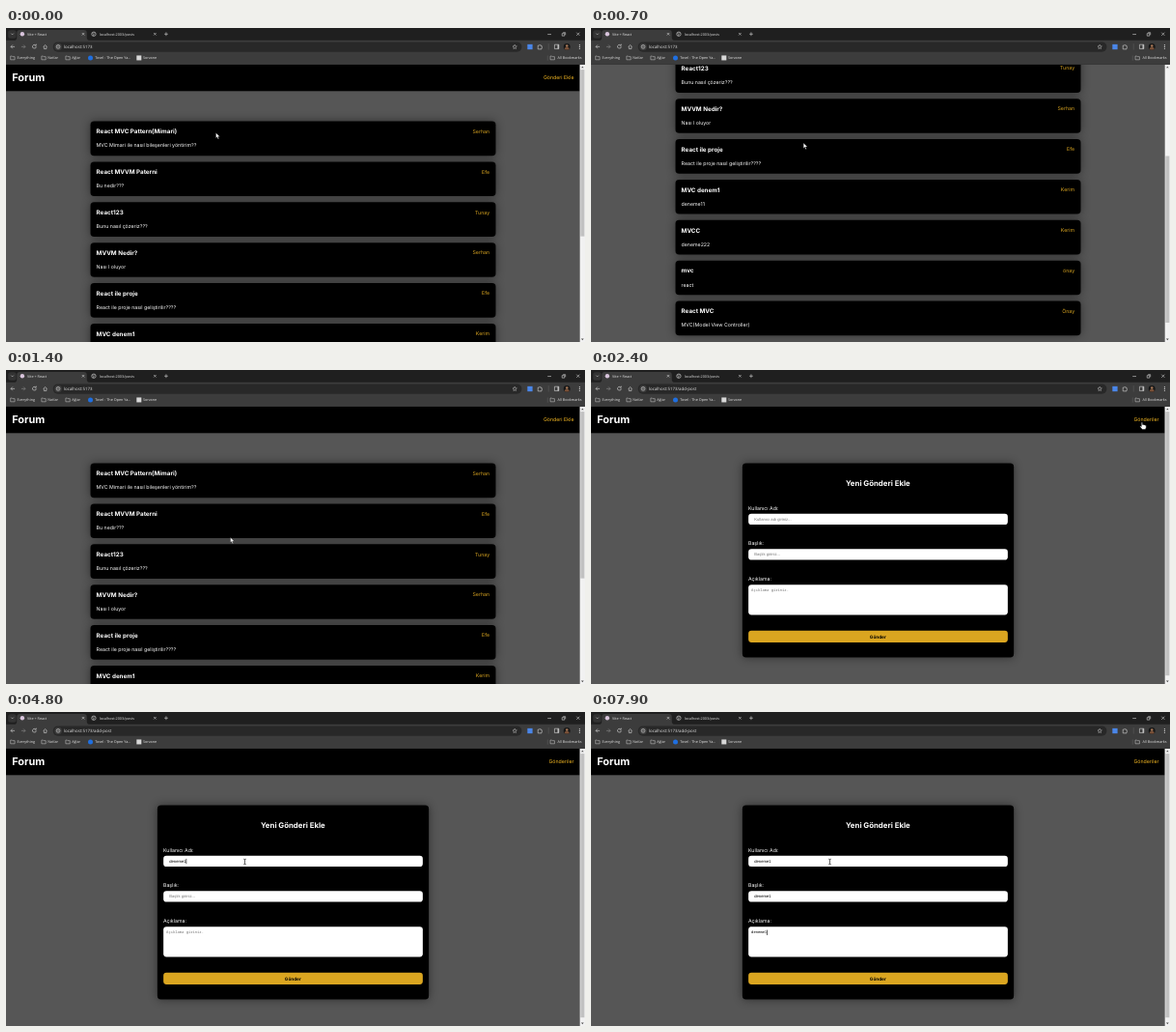
These frames come from a looping animation (600x325 px, 8000 ms). An HTML page:

```html
<!DOCTYPE html>
<html lang="tr">
<head>
<meta charset="utf-8">
<title>Forum</title>
<style>
  html, body { margin: 0; width: 600px; height: 325px; overflow: hidden; background: #565656; }
  :where(#screen, #screen div, #screen svg) { position: absolute; left: 0; top: 0; }
  /* Laid out as a 1920 x 1040 desktop, shown at 600 x 325 */
  #screen { width: 1920px; height: 1040px; overflow: hidden; transform: scale(.3125); transform-origin: 0 0;
    font: 16.8px/24px Inter, sans-serif; color: #fff; text-rendering: geometricPrecision; white-space: nowrap; }
  #view { top: 121px; width: 1903px; height: 919px; overflow: hidden; background: #565656; }
  #page { width: 100%; }
  .header { width: 100%; height: 88px; background: #000; }
  .header b { position: absolute; left: 20px; top: 20px; font-size: 35px; line-height: 48px; }
  #link { left: auto; right: 20px; top: 32px; color: #fbbd23; }
  .card, #form { background: #000; border-radius: 12px; box-shadow: 0 0 30px rgba(0, 0, 0, .45); }
  .card { left: 279.5px; width: 1344px; height: 114px; }
  .card b { position: absolute; left: 20px; top: 20px; font-size: 20px; line-height: 29px; }
  .card span { position: absolute; left: 20px; top: 69px; }
  .card em { position: absolute; right: 20px; top: 22px; font-style: normal; color: goldenrod; }
  #form { left: 501.5px; top: 188px; width: 900px; height: 643px; }
  #form h1 { margin: 0; position: absolute; top: 50px; width: 100%; text-align: center; font: 700 25px/36px Inter, sans-serif; }
  #form label { position: absolute; left: 20px; }
  .field, .send { left: 20px; width: 860px; border-radius: 10px; box-sizing: border-box; }
  .field { height: 36px; padding-left: 20px; background: #fff; color: #000; font: 13.33px/36px "Liberation Sans", Arial, sans-serif; }
  .field.area { height: 100px; padding: 9px 10px; font: 12.2px/20px "Noto Sans Mono", monospace; }
  .field em { font-style: normal; color: #757575; }
  .field i { display: inline-block; width: 2px; height: 17px; margin-right: -2px; background: #000; vertical-align: middle; }
  .send { top: 554px; height: 39px; background: goldenrod; color: #000; text-align: center; font: 700 15px/39px Inter, sans-serif; }
  #bar { left: 1903px; top: 121px; width: 17px; height: 919px; background: #f1f1f1; }
  #thumb { left: 2px; width: 13px; background: #c1c1c1; }
  #chrome text { font: 12px "Open Sans", "Noto Sans", sans-serif; fill: #e3e3e3; }
  #chrome #url { font-size: 14px; }
  #pointer { overflow: visible; }
</style>
</head>
<body>
<div id="screen">
  <div id="view">
    <div id="page">
      <div class="header"><b>Forum</b><div id="link"></div></div>
      <div id="posts"></div>
      <div id="form">
        <h1>Yeni Gönderi Ekle</h1>
        <div class="send">Gönder</div>
      </div>
    </div>
  </div>
  <div id="bar">
    <div id="thumb"></div>
    <svg width="17" height="919" fill="#505050"><path d="M4 11l4.500-5 4.500 5zM4 908l4.500 5 4.500-5z"/></svg>
  </div>

  <svg id="chrome" width="1920" height="121" fill="none" stroke="#d0d0d0" stroke-width="2">
    <g stroke="none">
      <rect width="1920" height="121" fill="#1f1f1f"/>
      <path d="M0 41H26Q36 41 36 31V16Q36 6 46 6H258Q268 6 268 16V31Q268 41 278 41H1920V121H0z" fill="#3c3c3c"/>
      <rect x="7" y="7" width="27" height="27" rx="8" fill="#333"/>
      <rect x="156" y="46" width="1554" height="33" rx="16" fill="#282828"/>
      <circle cx="173" cy="62" r="12" fill="#3c3c3c"/>
      <circle cx="54" cy="20" r="7" fill="#d8c4dc"/>
      <circle cx="280" cy="99" r="8" fill="#1f6fe0"/>
      <rect x="433" y="91" width="16" height="16" fill="#d8d8d8"/>
      <rect x="1729" y="54" width="17" height="17" fill="#4a86e8"/>
      <circle cx="1860" cy="62" r="11" fill="#171717"/>
      <path d="M1852 70q0-7 8-7t8 7l-4 2h-8z" fill="#7b5138"/>
      <circle cx="1860" cy="59" r="4" fill="#a87958"/>
      <g fill="#d0d0d0">
        <circle cx="1902" cy="56" r="2"/><circle cx="1902" cy="62" r="2"/><circle cx="1902" cy="68" r="2"/>
        <path d="M1829 55h4v14h-4z"/>
      </g>
    </g>
    <path d="M17 18l4 4 4-4M252 16l8 8m0-8l-8 8M490 16l8 8m0-8l-8 8M525 20h12m-6-6v12
      M1796 21h12M1844 18h8v8h-8zM1847 15h8v8M1892 15l10 10m0-10l-10 10"/>
    <path d="M29 62H16m6-6l-6 6 6 6M100 61a6 6 0 1 1-2-4m2-4v5h-5M124 62l6-6 6 6M126 61v8h8v-8"/>
    <path d="M51 62h13m-6-6l6 6-6 6" stroke="#888"/>
    <circle cx="291" cy="20" r="7"/>
    <path d="M286 17l6 4-3 5M291 14l4 4"/>
    <circle cx="173" cy="62" r="6"/>
    <path d="M173 61v4m0-7v2"/>
    <path d="M1687 55l2 5 5 .500-4 3.500 1 5-4-3-4 3 1-5-4-3.500 5-.500z" stroke-width="1.500"/>
    <path d="M1764 58h4q2-5 4 0h4v4q5 2 0 4v4h-12zM1819 55h14v14h-14z"/>
    <path d="M1799 52v20M1796 91v17" stroke="#5a5a5a"/>
    <g id="folders"></g>
    <g id="captions" stroke="none"><text id="url" x="192" y="67"></text></g>
  </svg>

  <svg id="pointer" width="1" height="1">
    <path id="arrow" d="M0 0V18L4 14 7 21 10 20 7 13H13z" fill="#fff" stroke="#000"/>
    <path id="hand" d="M0 2Q2-1 4 2V9Q7 7 8 10 11 8 12 11 15 9 16 13V19L13 25H3L-5 15Q-4 12 0 15z" fill="#fff" stroke="#000" stroke-width="1.500"/>
    <path id="beam" d="M-4-9q4 0 4 2 0-2 4-2M0-7V7M-4 9q4 0 4-2 0 2 4 2" fill="none" stroke="#000" stroke-width="2"/>
  </svg>
</div>

<script>
const $ = id => document.getElementById(id);
const show = (id, on) => $(id).style.display = on ? '' : 'none';

const posts = [
  ['React MVC Pattern(Mimari)', 'MVC Mimari ile nasıl bileşenleri yöntirim??', 'Serhan'],
  ['React MVVM Paterni', 'Bu nedir???', 'Efe'],
  ['React123', 'Bunu nasıl çözeriz???', 'Tunay'],
  ['MVVM Nedir?', 'Nası l oluyor', 'Serhan'],
  ['React ile proje', 'React ile proje nasıl geliştirilir????', 'Efe'],
  ['MVC denem1', 'deneme11', 'Kerim'],
  ['MVCC', 'deneme222', 'Kerim'],
  ['mvc', 'react', 'önay'],
  ['React MVC', 'MVC(Model View Controller)', 'Önay']
];
$('posts').innerHTML = posts.map(([title, body, author], i) =>
  `<div class="card" style="top:${188 + i * 134}px"><b>${title}</b><span>${body}</span><em>${author}</em></div>`).join('');

// Each field: label, placeholder, top, focus time, time of every keystroke
const fields = [
  ['Kullanıcı Adı:', 'Kullanıcı adı giriniz...', 167, 3300, [4000, 4100, 4200, 4400, 4400, 4500, 4800]],
  ['Başlık:', 'Başlık giriniz...', 284, 5200, [5800, 6000, 6000, 6000, 6200, 6200, 6500]],
  ['Açıklama:', 'Açıklama giriniz.', 402, 6800, [7200, 7300, 7400, 7600, 7700, 7900, 7900]]
];
$('form').insertAdjacentHTML('beforeend', fields.map(([label, hint, top], i) =>
  `<label style="top:${top - 30}px">${label}</label>
   <div class="field ${i == 2 ? 'area' : ''}" style="top:${top}px"><span></span><i></i><em>${hint}</em></div>`).join(''));
const boxes = [...document.querySelectorAll('.field')];

$('folders').innerHTML = [15, 118, 198, 1805].map(x =>
  `<path d="M${x} 93h5l2 2h7v10h-14z" stroke-width="1.600"/>`).join('');
$('captions').insertAdjacentHTML('beforeend', [
  [70, 24, 'Vite + React'], [310, 24, 'localhost:2003/posts'], [37, 103, 'Everything'], [138, 103, 'Notlar'],
  [218, 103, 'Ağlar'], [295, 103, 'Tovel - The Open Ya...'], [454, 103, 'Sorvane'], [1829, 103, 'All Bookmarks']
].map(([x, y, text]) => `<text x="${x}" y="${y}">${text}</text>`).join(''));

// Keys are [time, ...values]
const scrollKeys = [[0, 0], [100, 40], [400, 273], [800, 545], [900, 555], [1000, 480], [1300, 20], [1400, 0]];
const pointerKeys = [[0, 696, 347], [400, 702, 343], [900, 706, 401], [1400, 744, 554],
  [1900, 1750, 225], [2200, 1825, 172], [2400, 1825, 172], [3200, 792, 496]];
const smooth = k => k * k * (3 - 2 * k);

function at(keys, t, ease = k => k) {
  const i = keys.findIndex(key => key[0] > t);
  if (i < 0) return keys[keys.length - 1].slice(1);
  const [a, b] = [keys[i - 1], keys[i]];
  const k = ease((t - a[0]) / (b[0] - a[0]));
  return a.slice(1).map((v, j) => v + (b[j + 1] - v) * k);
}

function draw(t) {
  const onForm = t >= 2400;
  const [scroll] = at(scrollKeys, t);
  show('posts', !onForm);
  show('form', onForm);
  $('link').textContent = onForm ? 'Gönderiler' : 'Gönderi Ekle';
  $('url').textContent = 'localhost:5173' + (onForm ? '/add-post' : '');
  $('page').style.top = -scroll + 'px';

  const content = onForm ? 931 : 1474;
  $('thumb').style.top = 17 + scroll / content * 885 + 'px';
  $('thumb').style.height = 885 * 919 / content + 'px';

  const blinkedOff = t >= 3800 && t < 4000;
  fields.forEach(([, , , focus, keystrokes], i) => {
    const [text, caret, hint] = boxes[i].children;
    const blur = i < 2 ? fields[i + 1][3] : Infinity;
    text.textContent = 'deneme1'.slice(0, keystrokes.filter(time => time <= t).length);
    caret.style.visibility = t >= focus && t < blur && !blinkedOff ? '' : 'hidden';
    hint.hidden = text.textContent !== '';
  });

  const [x, y] = at(pointerKeys, t, smooth);
  const overLink = x > 1780 && y < 195;
  const overInput = onForm && x < 1381 && y > 476;
  $('pointer').style.transform = `translate(${x}px, ${y}px)`;
  show('hand', overLink);
  show('beam', overInput);
  show('arrow', !overLink && !overInput);
}

function tick() {
  draw(Math.floor(performance.now() % 8000 / 100) * 100);
  requestAnimationFrame(tick);
}
tick();
</script>
</body>
</html>
```
